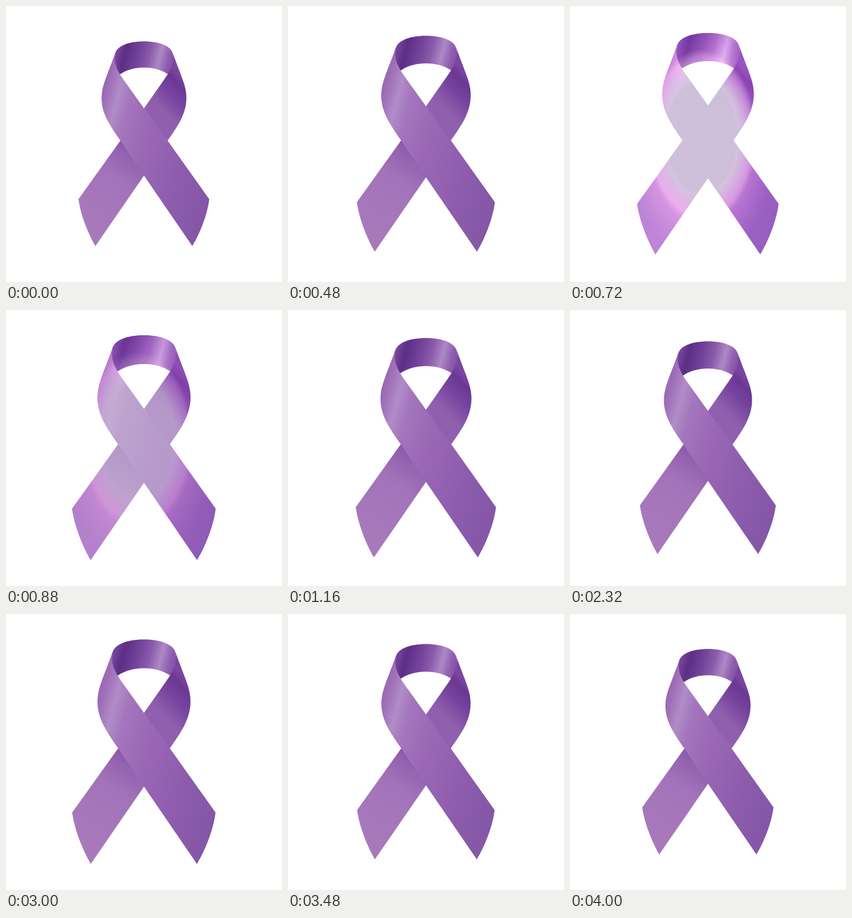
Recreate the animation shown at these times as an HTML page with a canvas. Size 480 by 480 pixels, loop 4040 ms.

```html
<!DOCTYPE html>
<html lang="en">
<head>
<meta charset="utf-8">
<title>Purple ribbon</title>
<style>
  html, body { margin: 0; width: 100%; height: 100%; overflow: hidden; background: #fff; }
  canvas { display: block; width: 480px; height: 480px; }
</style>
</head>
<body>
<canvas id="stage" width="480" height="480"></canvas>
<script>
const ctx = document.getElementById('stage').getContext('2d');
const LOOP = 4040, STEP = 40;
const CX = 240, CY = 239.5;

// Ribbon pieces, back to front; the band runs on under the strands
const band = new Path2D(`M189.5 85 C191 70 212 61.5 240 61.5 C268 61.5 289 70 290.5 85
  C293 98 290 110 283 119.5 C270 110.5 255 107 240 107 C225 107 210 110.5 197 119.5
  C190 110 187 98 189.5 85 Z`);
const rightStrand = new Path2D(`M290 81 C295 97 303 115 309 133 C316 154 316 174 304 198
  C299 208 289 223 281 234 L240 295 L155.5 417.5 C143 396 130 364 126 336 L199 234
  L240 178 L275 128 C287 111 294 99 290 81 Z`);
const leftStrand = new Path2D(`M190 81 C185 97 177 115 171 133 C164 154 164 174 176 198
  C181 208 191 223 199 234 L240 295 L324 417.5 C337 396 350 364 353.5 336 L281 234
  L240 178 L204.3 128 C192.5 111 187 99 190 81 Z`);

function withStops(g, stops) {
  stops.forEach(([at, color]) => g.addColorStop(at, color));
  return g;
}
const linear = (x0, y0, x1, y1, stops) =>
  withStops(ctx.createLinearGradient(x0, y0, x1, y1), stops);
const radial = (r, stops) =>
  withStops(ctx.createRadialGradient(0, 0, 0, 0, 0, r), stops);

const bandFill = linear(190, 80, 289, 104, [
  [0, '#7b48a0'], [.17, '#5c2e86'], [.4, '#74439a'],
  [.58, '#8a5aab'], [.76, '#ae88c6'], [.9, '#9060b0'], [1, '#8250a6']
]);
const upperRight = linear(312, 130, 250, 190, [
  [0, '#7a46a0'], [.15, '#6b3795'], [.42, '#78469f'], [.75, '#8f5fae'], [1, '#9060b0']
]);
const lowerLeft = linear(232, 236, 142, 372, [
  [0, '#7f4da4'], [.2, '#9362b1'], [.45, '#a273b9'], [1, '#a779bb']
]);
const leftFill = linear(167, 145, 389, 206, [
  [0, '#9866b2'], [.05, '#a072b9'], [.13, '#b18cc8'], [.22, '#a476bd'],
  [.41, '#9a68b5'], [.74, '#8d5cad'], [1, '#8456a6']
]);
const pale = radial(122, [
  [0, 'rgba(208,195,220,.96)'], [.48, 'rgba(208,195,220,.95)'], [.72, 'rgba(211,180,222,0)']
]);
const shine = radial(122, [
  [0, '#000'], [.46, '#000'], [.66, 'rgb(66,60,46)'], [1, 'rgb(30,22,34)']
]);

function ribbon() {
  ctx.fillStyle = bandFill;
  ctx.fill(band);

  ctx.save();
  ctx.clip(rightStrand);
  ctx.fillStyle = upperRight;
  ctx.fillRect(230, 70, 100, 172);
  ctx.fillStyle = lowerLeft;
  ctx.fillRect(120, 225, 125, 200);
  ctx.restore();

  ctx.fillStyle = leftFill;
  ctx.fill(leftStrand);
}

function layer(mode, fill) {
  ctx.globalCompositeOperation = mode;
  ctx.fillStyle = fill;
  ctx.fillRect(-300, -300, 600, 600);
}

// Pale light over the crossing; the white paper keeps the shine inside the ribbon
function glow(power) {
  if (power <= 0) return;
  ctx.save();
  ctx.translate(230, 228);
  ctx.scale(1, 1.6);
  ctx.globalAlpha = power;
  layer('source-atop', pale);
  ctx.globalAlpha = 1;
  layer('destination-over', '#fff');
  ctx.globalAlpha = power;
  layer('color-dodge', shine);
  ctx.restore();
}

function zoom(t) {
  const rise = (a, b) => (t - a) / (b - a);
  let k;
  if (t < 870) k = rise(0, 870);
  else if (t < 1910) k = 1 - rise(870, 1910);
  else if (t < 2960) k = rise(1910, 2960);
  else k = 1 - rise(2960, LOOP);
  return 1 + .1 * k;
}

function glowPower(t) {
  const k = Math.min((t - 520) / 160, (1000 - t) / 200);
  return Math.max(0, Math.min(1, k));
}

function draw(now) {
  const t = Math.floor((now % LOOP) / STEP) * STEP;
  const s = zoom(t);
  ctx.setTransform(1, 0, 0, 1, 0, 0);
  ctx.clearRect(0, 0, 480, 480);
  ctx.setTransform(s, 0, 0, s, CX * (1 - s), CY * (1 - s));
  ribbon();
  glow(glowPower(t));
}

const start = performance.now();
function tick() {
  draw(performance.now() - start);
  requestAnimationFrame(tick);
}
tick();
</script>
</body>
</html>
```
